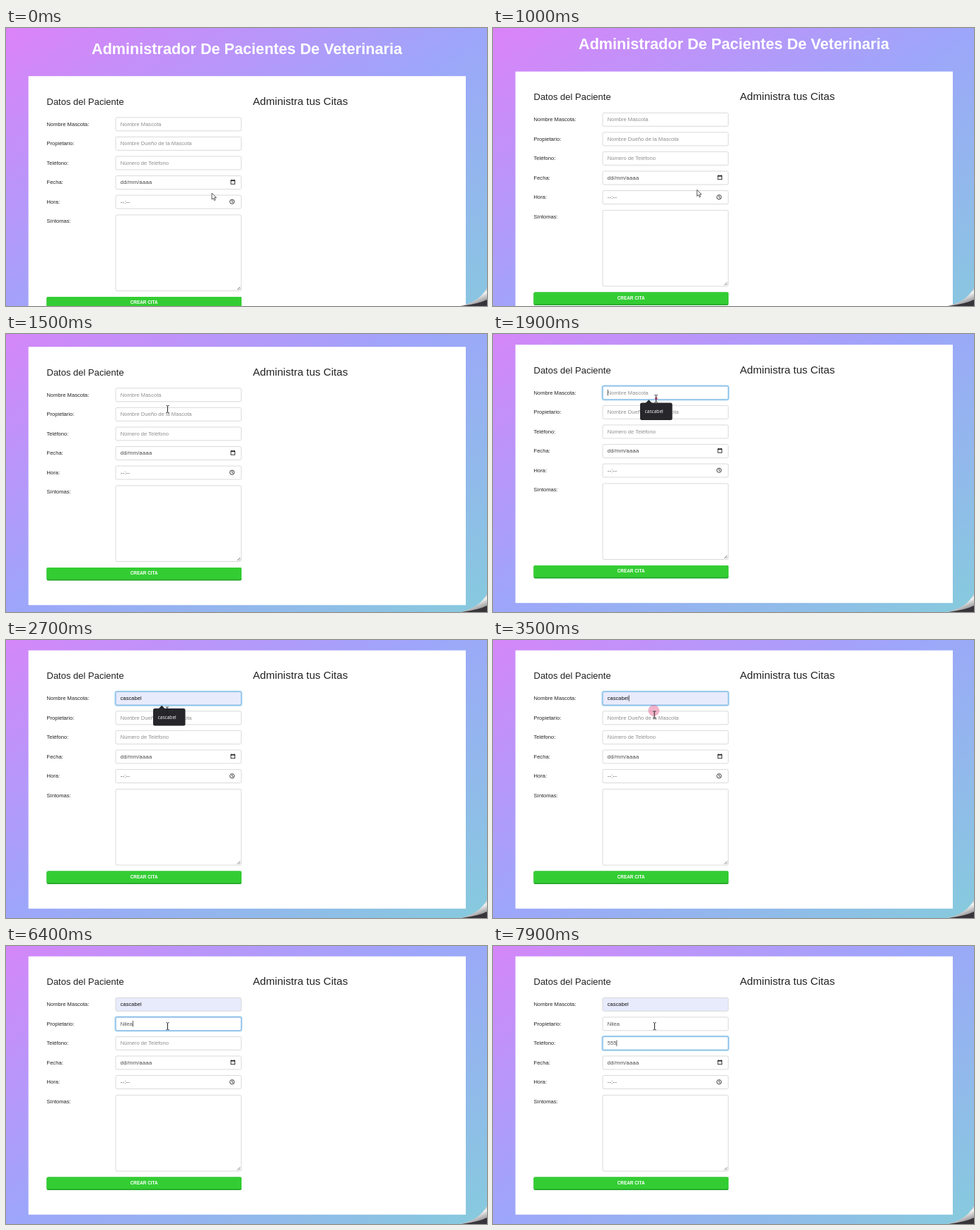
Animation, 680 px wide and 394 px high, one loop 8000 ms. Source, as an HTML page:

```html
<!DOCTYPE html>
<html lang="es">
<head>
<meta charset="utf-8">
<title>Administrador de pacientes</title>
<style>
  html, body { margin: 0; width: 100%; height: 100%; overflow: hidden; }
  svg { display: block; width: 100%; height: 100%; }
  text { font: 7.6px "Liberation Sans", Arial, sans-serif; fill: #222; white-space: pre; }
  .title { font-size: 21.65px; font-weight: bold; fill: #fff; text-anchor: middle; }
  .box { fill: #fff; stroke: #d1d1d1; stroke-width: .8; }
  .hint { fill: #8e8e8e; }
  .value { fill: #555; }
  .spaced { letter-spacing: .27px; fill: #444; }
  .button { font-size: 6.4px; font-weight: bold; fill: #fff; text-anchor: middle; }
  .popup text { font: 6.6px "Open Sans", sans-serif; fill: #fff; }
  .popup path, .popup rect { fill: #26262b; }
</style>
</head>
<body>
<svg viewBox="0 0 680 394">
  <defs>
    <linearGradient id="sky" x2="1" y2="1">
      <stop stop-color="#dc82f8"/>
      <stop offset=".5" stop-color="#9da6fa"/>
      <stop offset="1" stop-color="#86cbdd"/>
    </linearGradient>
    <linearGradient id="curl" x1=".3" y1=".2" x2=".75" y2="1">
      <stop stop-color="#8d8d92"/>
      <stop offset=".4" stop-color="#f2f2f2"/>
      <stop offset="1" stop-color="#77777b"/>
    </linearGradient>
  </defs>

  <g id="page">
    <rect width="680" height="448" fill="url(#sky)"/>
    <text class="title" x="340.5" y="36.8">Administrador De Pacientes De Veterinaria</text>
    <rect x="31.7" y="68.2" width="618.3" height="366" fill="#fff"/>
    <text x="57.5" y="108.5" style="font-size:13px">Datos del Paciente</text>
    <text x="349" y="108.5" style="font-size:15.1px">Administra tus Citas</text>
    <g id="form"></g>

    <g fill="none" stroke="#222" stroke-width=".9">
      <rect x="318" y="216" width="5.6" height="5.2"/>
      <path d="M317.6 216.3h6.4M319.2 214.8v1M322.4 214.8v1" stroke-width="1.2"/>
      <circle cx="319.6" cy="246.2" r="3.1"/>
      <path d="M319.6 244.2v2.2l1.5 .9"/>
    </g>
    <text x="57.5" y="276.3">Síntomas:</text>
    <rect class="box" x="155" y="264.9" width="177.6" height="107.6" rx="2"/>
    <path d="M327 371l4-4M329.6 371l1.6-1.6" stroke="#555" stroke-width=".8"/>

    <rect x="57.5" y="381" width="275.5" height="18.5" rx="2" fill="#27a52b"/>
    <rect x="57.5" y="381" width="275.5" height="16.7" rx="2" fill="#33cd33"/>
    <text class="button" x="195.2" y="391">CREAR CITA</text>

    <rect id="caret" width=".7" height="8.6" fill="#222"/>
    <g class="popup" id="petPopup">
      <path d="M215.5 151l4.7-4.7 4.7 4.7z"/>
      <rect x="208" y="150.5" width="45.5" height="24.5" rx="2.5"/>
      <text x="214.6" y="165">cascabel</text>
    </g>
    <g class="popup" id="ownerPopup">
      <path d="M215.5 179l4.7-4.7 4.7 4.7z"/>
      <rect x="208" y="178.3" width="32.5" height="24.5" rx="2.5"/>
      <text x="214.6" y="193">Ubo</text>
    </g>
  </g>

  <circle id="click" fill="#e2558a"/>
  <path id="arrow" d="M0 0v9l2.1-1.9 1.5 3.3 1.5-.7-1.5-3.2h2.8z" fill="#fff" stroke="#333" stroke-width=".8"/>
  <path id="beam" d="M-2 -5h1.3l.7.7.7-.7h1.3M0-4.3v8.6M-2 5h1.3l.7-.7.7.7h1.3" fill="none" stroke="#222" stroke-width="1"/>

  <path d="M642 394Q670 388 680 368V394z" fill="url(#curl)"/>
  <path d="M644 394Q668 391 680 385V394z" fill="#37343a"/>
</svg>

<script>
const LOOP = 8000, STEP = 100, TEXT_X = 161.7;
const $ = id => document.getElementById(id);
const clamp = v => Math.max(0, Math.min(1, v));

// focus: [start, end]; typed: [time, text]
const fields = [
  { label: 'Nombre Mascota:', hint: 'Nombre Mascota', focus: [1800, 4100],
    typed: [[2700, 'cascabel']], autofill: 2700 },
  { label: 'Propietario:', hint: 'Nombre Dueño de la Mascota', focus: [4100, 6700],
    typed: [[5500, 'N'], [5700, 'Ni'], [6200, 'Nil'], [6300, 'Nile'], [6400, 'Nilea']] },
  { label: 'Teléfono:', hint: 'Número de Teléfono', focus: [6700, LOOP],
    typed: [[7700, '55'], [7900, '555']] },
  { label: 'Fecha:', hint: 'dd/mm/aaaa', spaced: true },
  { label: 'Hora:', hint: '--:--', spaced: true },
];

const scrollKeys = [[900, 0], [1200, 19.5], [1500, 50], [1700, 52.5], [1900, 53], [2000, 53.5]];
const cursorKeys = [[900, 291, 234], [1200, 283, 220], [1500, 228.5, 106.5], [1800, 230.5, 91.5],
  [2100, 230.5, 91.5], [2600, 228, 100], [3300, 227, 100], [3500, 228.2, 106],
  [3700, 228.2, 106], [4000, 228.5, 113.7]];
const clicks = [[1880, 230.8, 91.5], [3350, 227.3, 100], [4080, 228.5, 113.7]];
const caretResets = [1800, 3400, 4100, 5500, 5700, 6200, 6300, 6400, 6800, 7700, 7900];

const last = (list, test) => list.filter(test).pop();

function along(keys, t) {
  const next = keys.findIndex(k => k[0] > t);
  if (next === 0) return keys[0].slice(1);
  if (next < 0) return keys[keys.length - 1].slice(1);
  const a = keys[next - 1], b = keys[next], p = (t - a[0]) / (b[0] - a[0]);
  return a.slice(1).map((v, i) => v + (b[i + 1] - v) * p);
}

fields.forEach((f, i) => {
  f.y = 136.3 + 27.55 * i;
  const top = f.y - 9.5, base = f.y + 2.4;
  const g = document.createElementNS('http://www.w3.org/2000/svg', 'g');
  g.innerHTML = `
    <text x="57.5" y="${base}">${f.label}</text>
    <rect class="box" x="155" y="${top}" width="177.6" height="19" rx="2"/>
    <g class="glow" fill="none" opacity="0">
      <rect x="154.6" y="${top - .4}" width="178.4" height="19.8" rx="2.4" stroke="#b5d9f2" stroke-width="2.4"/>
      <rect x="155" y="${top}" width="177.6" height="19" rx="2" stroke="#7fb9e6" stroke-width=".9"/>
    </g>
    <text class="${f.spaced ? 'spaced' : 'hint'}" x="${TEXT_X}" y="${base}">${f.hint}</text>`;
  $('form').append(g);
  f.box = g.querySelector('.box');
  f.glow = g.querySelector('.glow');
  f.text = g.lastElementChild;
});

function show(el, visible) {
  el.style.display = visible ? '' : 'none';
}

function drawField(f, t) {
  const [start, end] = f.focus;
  const entry = last(f.typed, k => k[0] <= t);
  const filled = t >= f.autofill;
  f.text.textContent = entry ? entry[1] : f.hint;
  f.text.setAttribute('class', entry ? 'value' : 'hint');
  f.text.style.fill = filled ? '#111' : '';
  f.box.style.fill = filled ? '#e8ebfc' : '';
  f.glow.setAttribute('opacity', Math.min(clamp((t - start + 100) / 200), clamp((end + 100 - t) / 200)));
  if (t >= start && t < end) {
    const x = TEXT_X + (entry ? f.text.getComputedTextLength() + .2 : .2);
    $('caret').setAttribute('x', x);
    $('caret').setAttribute('y', f.y - 4.5);
  }
}

function drawPointer(t) {
  const [x, y] = along(cursorKeys, t);
  const overText = t >= 1400;
  show($('arrow'), !overText);
  show($('beam'), overText);
  for (const id of ['arrow', 'beam']) $(id).setAttribute('transform', `translate(${x} ${y})`);

  const click = last(clicks, c => c[0] <= t);
  const age = click ? t - click[0] : Infinity;
  show($('click'), age < 240);
  if (age < 240) {
    $('click').setAttribute('cx', click[1]);
    $('click').setAttribute('cy', click[2]);
    $('click').setAttribute('r', 1.2 + age * .045);
    $('click').setAttribute('opacity', clamp(.9 - age * .003));
  }
}

function draw(now) {
  const t = Math.floor(now % LOOP / STEP) * STEP;
  $('page').setAttribute('transform', `translate(0 ${-along(scrollKeys, t)[0]})`);
  fields.filter(f => f.focus).forEach(f => drawField(f, t));
  const reset = last(caretResets, r => r <= t);
  show($('caret'), reset !== undefined && (t - reset) % 1000 < 500);
  show($('petPopup'), t >= 1900 && t < 3400);
  show($('ownerPopup'), t >= 4200 && t < 5600);
  drawPointer(t);
}

let origin;
function tick(now) {
  origin ??= now;
  draw(now - origin);
  requestAnimationFrame(tick);
}
draw(0);
requestAnimationFrame(tick);
</script>
</body>
</html>
```
